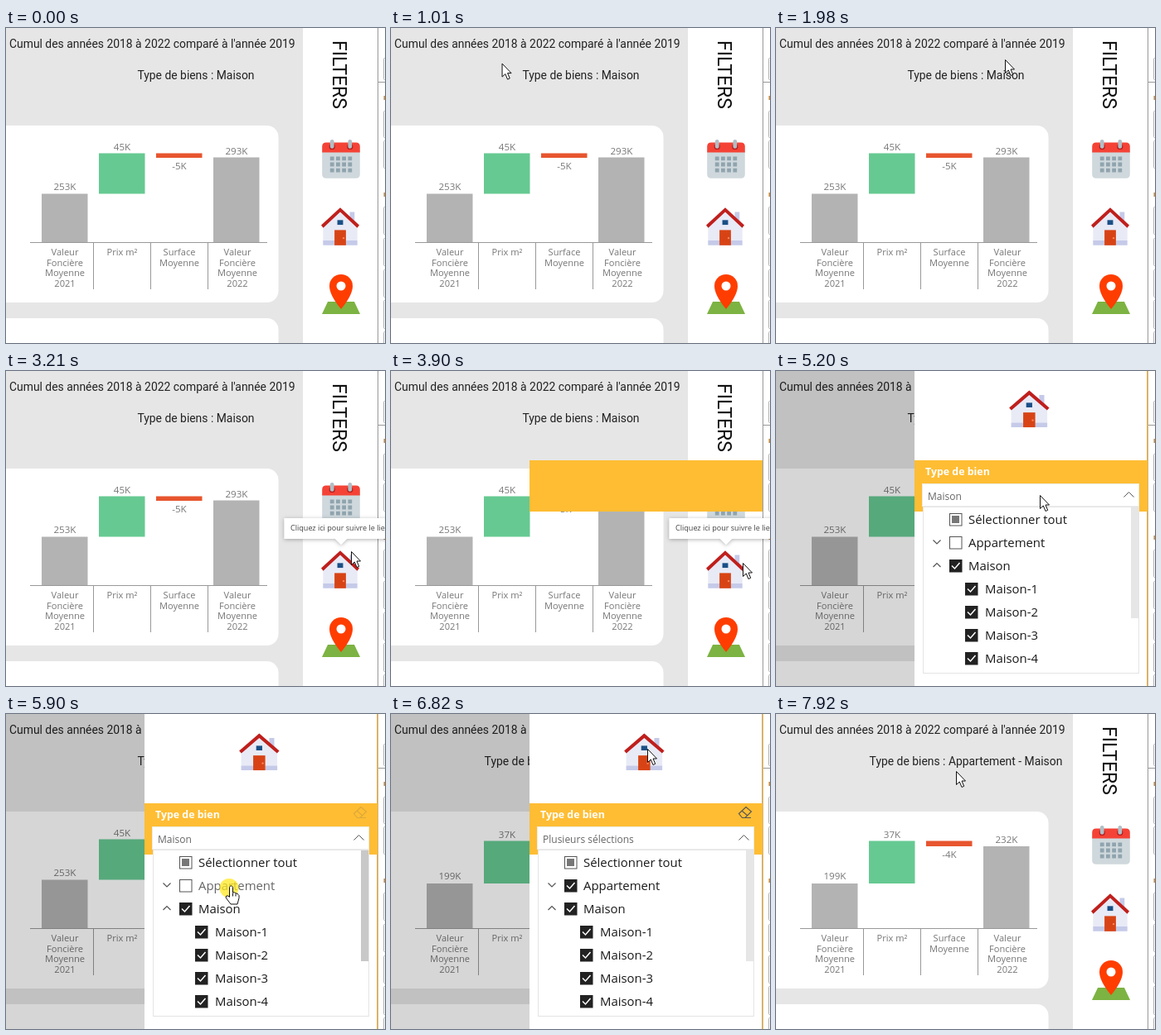
An HTML page that plays this animation: 457 by 381 pixels, repeating every 8 s.

```html
<!DOCTYPE html>
<html lang="fr">
<head>
<meta charset="utf-8">
<title>Filtres du rapport</title>
<style>
html, body { margin: 0; width: 100%; height: 100%; overflow: hidden; background: #e6e6e6; }
svg { display: block; width: 100%; height: 100%; }
text { font-family: "Open Sans", "Noto Sans", sans-serif; }
.din { font-family: Roboto, sans-serif; fill: #222; font-size: 13.9px; }
.mid { text-anchor: middle; }
.axis { font-size: 11.1px; fill: #777; text-anchor: middle; }
.value { font-size: 11.6px; fill: #777; text-anchor: middle; }
.input { font-size: 12.1px; fill: #444; }
.field { font-size: 10.1px; fill: #333; }
.item { font-size: 14.9px; fill: #1a1a1a; }
.line { fill: none; stroke: #555; }
</style>
</head>
<body>
<svg viewBox="0 0 457 381">
  <defs>
    <g id="house">
      <path fill="#e8eaf6" d="M42 39H6V23L24 6L42 23Z"/>
      <path fill="#c5cae9" d="M39 21L34 16V9H39ZM6 39H42V44H6Z"/>
      <path fill="#bf1f1c" d="M24 4.3L4 22.9L6.2 25.6L24 9L41.8 25.6L44 22.9Z"/>
      <path fill="#d84315" d="M18 28H30V44H18Z"/>
      <path fill="#1a4f86" d="M21 17.500H27V22.500H21Z"/>
      <circle cx="27.5" cy="36.5" r="1" fill="#ff8a65"/>
    </g>
    <filter id="shadow" x="-20%" y="-50%" width="140%" height="200%">
      <feDropShadow dx="0" dy="1" stdDeviation="2.5" flood-opacity=".3"/>
    </filter>
  </defs>

  <rect width="457" height="381" fill="#e6e6e6"/>
  <text class="din" x="4" y="24">Cumul des années 2018 à 2022 comparé à l'année 2019</text>
  <text class="din mid" id="kinds" x="229" y="62.3"></text>
  <rect x="-30" y="118" width="358.5" height="214" rx="14" fill="#fff"/>
  <rect x="-30" y="351" width="358.5" height="60" rx="14" fill="#fff"/>
  <g id="chart"></g>
  <path stroke="#999" fill="none" d="M29 259.5H315M105.5 260V316M174.5 260V316M243.5 260V316"/>
  <g id="axis"></g>

  <rect x="358" width="99" height="381" fill="#fff"/>
  <text class="din" transform="translate(394 15) rotate(90)" style="font-size:23px;fill:#111">FILTERS</text>
  <g transform="translate(375.2 131.4) scale(1.2)">
    <path fill="#cfd8dc" d="M5 14H43V38Q43 42 39 42H9Q5 42 5 38Z"/>
    <path fill="#f44336" d="M5 16V10Q5 6 9 6H39Q43 6 43 10V16Z"/>
    <path fill="#b71c1c" d="M12 10a3 3 0 0 1 6 0a3 3 0 0 1-6 0M30 10a3 3 0 0 1 6 0a3 3 0 0 1-6 0"/>
    <path stroke="#b0bec5" stroke-width="4" stroke-linecap="round" d="M15 5V10M33 5V10"/>
    <path stroke="#90a4ae" stroke-width="4" stroke-dasharray="4 2" d="M13 22H35M13 28H35M13 34H35"/>
  </g>
  <use href="#house" transform="translate(375.4 212.2) scale(1.15)"/>
  <path fill="#7cb342" d="M381 346L388 331H420L427 346Z"/>
  <path fill="#ff3d00" d="M404 340Q390 323 390 312A14 14 0 0 1 418 312Q418 323 404 340Z"/>
  <circle cx="404" cy="312" r="5.5" fill="#fff"/>

  <path fill="none" stroke="#999" d="M448.5 0V381M449 65.5H457"/>
  <g id="strip" fill="#fff" stroke="#b5b5b5"></g>
  <path fill="#c98a3f" d="M455.5 82h1.5v5h-1.5zM455.5 199h1.5v5h-1.5z"/>

  <g id="dim">
    <rect width="167" height="381" opacity=".16"/>
    <rect x="167" width="280" height="381" fill="#fff"/>
    <rect x="447" width="2" height="381" fill="#d9b36a"/>
  </g>
  <rect id="band" x="167" y="108" width="281" height="62" fill="#ffbd33"/>

  <g id="tooltip">
    <path filter="url(#shadow)" fill="#fff" d="M335.5 178H475V203H411L404 210L397 203H335.5Z"/>
    <text x="343" y="193" font-size="9.05" fill="#444">Cliquez ici pour suivre le lien</text>
  </g>

  <g id="panel">
    <use href="#house" transform="translate(276.3 18.8) scale(1.21 1.12)"/>
    <text x="180" y="126" font-size="12.4" font-weight="700" fill="#fff">Type de bien</text>
    <g id="eraser" class="line" stroke-width="1.1">
      <path d="M419.5 120.5L428 112.5L434.5 118L427 125.5H423.5ZM423 117L430 123M426 125.5H434"/>
    </g>
    <rect x="176.5" y="136.5" width="261" height="27" fill="#fff" stroke="#ececec"/>
    <text id="choice" x="183" y="156" font-size="12" fill="#666"></text>
    <path id="arrowDown" class="line" d="M419.5 146.5L425.5 152.5L431.5 146.5"/>
    <path id="arrowUp" class="line" d="M419.5 152.5L425.5 146.5L431.5 152.5"/>
    <g id="fields">
      <text class="field" x="180" y="185">Valeur Foncière</text>
      <text class="field" x="320" y="185">Surface Carrez</text>
    </g>
    <g id="list">
      <rect x="177.5" y="164.5" width="260" height="201" fill="#fff" stroke="#e4e4e4"/>
      <rect id="scrollbar" x="428" y="165" width="9" height="134"/>
      <path class="line" stroke-width="1.2" d="M189.5 204.5L194 209L198.5 204.5M189.5 237L194 232.5L198.5 237"/>
      <g id="items"></g>
    </g>
  </g>

  <g id="cursor" fill="#fff" stroke="#111" stroke-linejoin="round">
    <circle id="halo" cx="-2.5" cy="3" r="11.5" fill="#ffe81a" stroke="none" opacity=".72"/>
    <path id="pointer" d="M.5 .5V16.5L4.3 13L7 19.5L9.7 18.3L7 12H11.5Z"/>
    <path id="hand" d="M-2 2Q0 -1.5 2 2V8.5Q4.500 7.500 5.500 9.500Q8 9 8.500 11Q10 11 9.500 15L7.500 22.500H-.5L-6.5 14.500Q-6.5 11.500 -3.5 12.500L-2 14ZM2 9V13M5.5 10V13"/>
  </g>
</svg>

<script>
const LOOP = 8000;
const $ = id => document.getElementById(id);
const show = (id, on) => { $(id).style.display = on ? '' : 'none'; };
const within = (t, from, to) => t >= from && t < to;
const rect = (x, y, w, h, extra = '') =>
  `<rect x="${x}" y="${y}" width="${w}" height="${h}" ${extra}/>`;
const label = (cls, x, y, text) => `<text class="${cls}" x="${x}" y="${y}">${text}</text>`;

// Each bar: x, top, bottom, colour, label, label baseline
const bars = (start, price, area, end) => [
  [43, start.top, 259, '#b3b3b3', start.text, start.top - 5],
  [112, price.top, price.bottom, '#66c992', price.text, price.top - 3.5],
  [181, area.top, area.bottom, '#e7552f', area.text, area.bottom + 14],
  [250, end.top, 259, '#b3b3b3', end.text, end.top - 4]
].map(([x, top, bottom, fill, text, y]) =>
  rect(x, top, 55.5, bottom - top, `fill="${fill}"`) + label('value', x + 28, y, text)).join('');

const houseBars = bars({ top: 200.5, text: '253K' }, { top: 151.5, bottom: 200.5, text: '45K' },
  { top: 151.5, bottom: 157, text: '-5K' }, { top: 156.5, text: '293K' });
const allBars = bars({ top: 205, text: '199K' }, { top: 153.5, bottom: 205, text: '37K' },
  { top: 153.5, bottom: 160, text: '-4K' }, { top: 160, text: '232K' });

$('axis').innerHTML = ['Valeur Foncière Moyenne 2021', 'Prix&nbsp;m²', 'Surface Moyenne', 'Valeur Foncière Moyenne 2022']
  .map((name, i) => name.split(' ').map((word, row) =>
    label('axis', [71, 140, 209, 279][i], 275 + row * 12.7, word)).join('')).join('');

$('strip').innerHTML = [[36, 26], [100, 32], [136, 33], [216, 33], [254, 33], [292, 33], [329, 34], [367, 33]]
  .map(([y, h]) => rect(455.5, y + .5, 20, h, 'rx="1"')).join('');

$('fields').innerHTML += [[179, 195, 72, '10000'], [179, 228, 77, '2086000000'], [319, 195, 72, '9,00'], [319, 228, 72, '9 654,00']]
  .map(([x, y, w, text]) => rect(x + .5, y - .5, w, 23.5, 'fill="#fff" stroke="#ddd"') +
    label('input', x + 8, y + 16.5, text)).join('');

function checkbox(x, y, state) {
  const on = state === 'on';
  const mark = on
    ? `<path fill="none" stroke="#fff" stroke-width="1.5" d="M${x + 3} ${y + 7.5}l3.5 3.5l6 -7"/>`
    : state === 'part' ? rect(x + 3, y + 3, 9, 9, 'fill="#777"') : '';
  return rect(x + .5, y + .5, 14.5, 14.5, `fill="${on ? '#222' : '#fff'}" stroke="${on ? '#222' : '#555'}"`) + mark;
}

const listItems = (flat, hovered) =>
  [['Sélectionner tout', 'part'], ['Appartement', flat], ['Maison', 'on'],
    ...[1, 2, 3, 4].map(n => ['Maison-' + n, 'on'])]
    .map(([text, state], i) => {
      const x = i > 2 ? 228 : 209, y = 171.5 + i * 28.05;
      const fade = i === 1 && hovered ? ' style="fill:#666"' : '';
      return checkbox(x, Math.round(y), state) +
        `<text class="item" x="${x + (i > 2 ? 24 : 23)}" y="${y + 13.3}"${fade}>${text}</text>`;
    }).join('');

// Cursor stops: time, x, y
const path = [
  [660, 411, 372], [1080, 112, 17], [1220, 68, 27], [1420, 68, 27], [1980, 276, 38],
  [2440, 276, 38], [3210, 416, 218], [3280, 416, 218], [3600, 424, 232], [4040, 424, 232],
  [4380, 370, 162], [4800, 318, 150], [5200, 318, 150], [5830, 271.5, 207.5], [6040, 271.5, 207.5],
  [6820, 309, 42], [7710, 309, 42], [7920, 217, 69], [LOOP, 217, 69]
];

function cursorAt(t) {
  const i = Math.max(1, path.findIndex(p => p[0] > t));
  const [t0, x0, y0] = path[i - 1], [t1, x1, y1] = path[i];
  const k = Math.min(1, Math.max(0, (t - t0) / (t1 - t0)));
  const e = k * k * (3 - 2 * k);
  return [x0 + (x1 - x0) * e, y0 + (y1 - y0) * e];
}

const cache = {};
function setContent(id, html) {
  if (cache[id] !== html) $(id).innerHTML = cache[id] = html;
}

function draw(t) {
  const checked = t >= 6040, updated = t >= 6400, open = t >= 4930;
  setContent('kinds', 'Type de biens : ' + (updated ? 'Appartement - Maison' : 'Maison'));
  setContent('chart', updated ? allBars : houseBars);
  setContent('choice', checked ? 'Plusieurs sélections' : 'Maison');

  show('tooltip', within(t, 3140, 4110));
  show('band', within(t, 3850, 7230));
  show('dim', within(t, 3970, 7230));
  show('panel', within(t, 4110, 7230));
  show('fields', !open);
  show('list', open);
  show('arrowDown', !open);
  show('arrowUp', open);
  show('eraser', within(t, 5270, 6890));
  $('eraser').setAttribute('opacity', checked ? 1 : .2);

  const [x, y] = cursorAt(t);
  const overList = within(t, 5200, 6820) && y > 165;
  setContent('items', listItems(checked ? 'on' : 'off', overList && y > 194));
  $('scrollbar').setAttribute('fill', overList ? '#c8c8c8' : '#e6e6e6');

  show('cursor', t >= 660);
  show('hand', overList);
  show('pointer', !overList);
  show('halo', within(t, 4860, 5000) || within(t, 5830, 6040) || within(t, 6890, 6960));
  $('cursor').setAttribute('transform', `translate(${x} ${y})`);
}

function tick() {
  draw(performance.now() % LOOP);
  requestAnimationFrame(tick);
}
tick();
</script>
</body>
</html>
```
